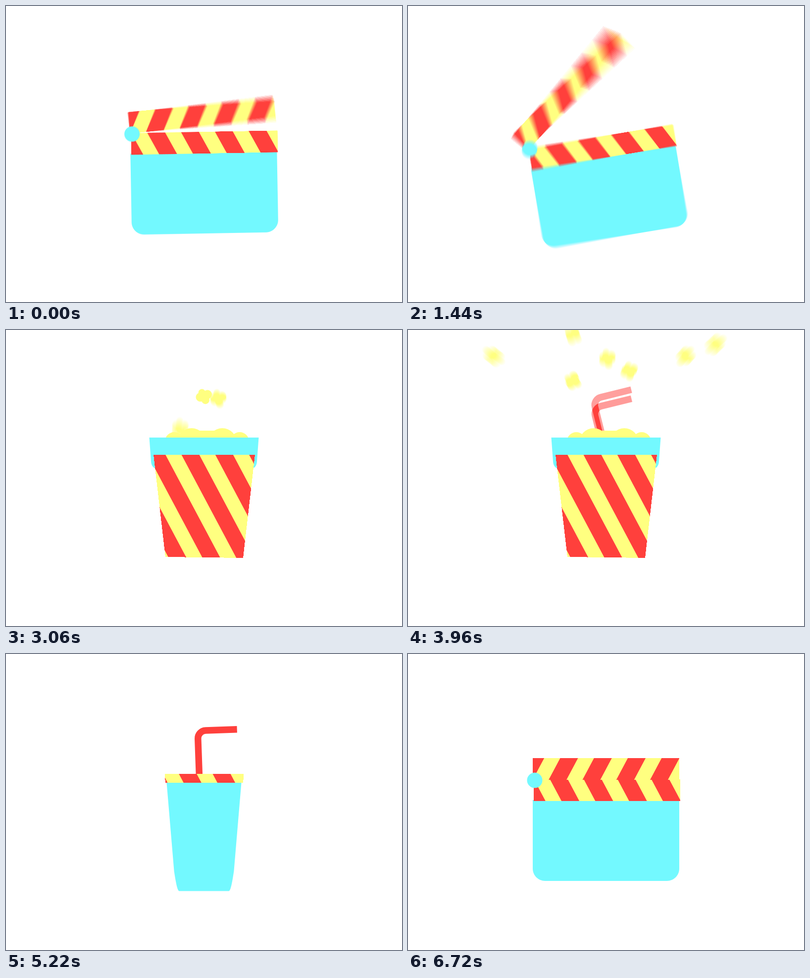
Animation of 800x600 px, one loop 7.26 s. Source, as an HTML page with a canvas:

```html
<!DOCTYPE html>
<html lang="en">
<head>
<meta charset="utf-8">
<title>Cinema morph</title>
<style>
html, body { margin: 0; width: 100%; height: 100%; overflow: hidden; background: #fff; }
canvas { display: block; }
</style>
</head>
<body>
<canvas id="stage" width="800" height="600"></canvas>
<script>
const LOOP = 7260, STEP = 60, LAST = 6720, SHUTTER = 30, SAMPLES = 12;
const RED = '#ff403c', YELLOW = '#ffff80', CYAN = '#73f9ff';
const out = document.getElementById('stage').getContext('2d');
const c = new OffscreenCanvas(800, 600).getContext('2d');
let t = 0;

// Progress of the current time from a to b: constant, slowing, or soft at both ends.
const linear = (a, b) => Math.min(1, Math.max(0, (t - a) / (b - a)));
const slowing = (a, b) => Math.sin(linear(a, b) * Math.PI / 2);
const soft = (a, b) => (1 - Math.cos(linear(a, b) * Math.PI)) / 2;
const mix = (a, b, p) => a.map((v, i) => v + (b[i] - v) * p);

// solid: half top, top, half bottom, bottom, corner rx, ry
// striped: top left, top right, top, bottom left, bottom right, bottom
const clap = [148, 296, 148, 460, 25, 25, 254, 550, 254, 254, 550, 298];
const wide = [126, 188, 126, 265, 12, 10, 286, 516, 253, 305, 497, 423];
const box = [110.5, 218, 106, 280, 8, 12, 298, 503, 253, 322, 479, 461];
const cup = [76, 255, 57, 480.5, 7, 40, 320.5, 480.5, 243, 322, 479, 261];

const BURST = 3960, MOUTH = 225, GRAVITY = 1.3, FLIGHT = 5;
// Where each piece is at BURST, FLIGHT steps after leaving the box
const pieces = [[173, 53], [333, 8], [403, 58], [447, 83], [333, 103], [561, 53], [621, 29]];

function disc(x, y, r) {
  c.moveTo(x + r, y);
  c.arc(x, y, r, 0, 7);
}

function spin(x, y, degrees, scale = 1) {
  c.translate(x, y);
  c.rotate(degrees * Math.PI / 180);
  c.scale(scale, scale);
  c.translate(-x, -y);
}

function fillStripes(points, start, lean) {
  c.save();
  c.beginPath();
  points.forEach(p => c.lineTo(...p));
  c.clip();
  c.fillStyle = YELLOW;
  c.fillRect(0, 0, 800, 600);
  c.fillStyle = RED;
  c.transform(1, 0, lean, 1, start - 254 * lean, 0);
  for (let k = -4; k < 6; k++) c.fillRect(k * 68.3, 0, 36, 600);
  c.restore();
}

function solid(w, top, v, bottom, rx, ry) {
  const y = bottom - ry, side = v + (w - v) * ry / (bottom - top);
  c.fillStyle = CYAN;
  c.beginPath();
  c.moveTo(400 - w, top);
  c.lineTo(400 + w, top);
  c.lineTo(400 + side, y);
  c.bezierCurveTo(400 + v, y + ry * .55, 400 + v - rx * .45, bottom, 400 + v - rx, bottom);
  c.lineTo(400 - v + rx, bottom);
  c.bezierCurveTo(400 - v + rx * .45, bottom, 400 - v, y + ry * .55, 400 - side, y);
  c.fill();
}

function arm() {
  const leaving = t > 1740 && t < 3000;
  const size = leaving ? 1 - .25 * linear(1740, 1880) - .75 * soft(1940, 2100)
    : t < 3000 ? 1 : soft(6000, 6600);
  if (size < .01) return;
  c.save();
  if (leaving) spin(548, 254, 180 * soft(1740, 2060), size);
  else if (t < 3000) spin(256, 256, -51.3 * slowing(-48, 792) - 17.7 * soft(792, 1170) + 69 * soft(1170, 1740));
  else spin(256, 256, -125 * (1 - soft(6060, 6660)), size);
  fillStripes([[252, 211], [548, 211], [548, 254.5], [252, 254.5]], 284.7, -.53);
  c.restore();
}

function straw() {
  const age = Math.max(0, t - BURST);
  const drop = t < BURST ? 0 : 18;
  c.save();
  c.translate(396.5 - 6 * soft(3960, 4320), 350 - 119 * soft(3780, 3940) + drop + 115 * soft(5520, 5760));
  spin(0, 0, -14 * Math.cos(age / 630 * 2 * Math.PI) * Math.exp(-age / 650));
  c.strokeStyle = RED;
  c.lineWidth = 13.5;
  c.beginPath();
  c.moveTo(0, 0);
  c.arcTo(0, -93.5, 79.5, -93.5, 16);
  c.lineTo(79.5, -93.5);
  c.stroke();
  c.restore();
}

function kernel(x, y, turn) {
  c.save();
  c.translate(x, y);
  c.rotate(turn);
  c.fillStyle = YELLOW;
  c.beginPath();
  disc(-6, -5, 9);
  disc(6, -6, 8);
  disc(5, 6, 9);
  disc(-5, 7, 7);
  c.fill();
  c.restore();
}

function popcorn() {
  for (let i = 0; i < 5; i++) {
    const start = 2760 + i * 130, u = linear(start, start + 600);
    const x = 400 + 50 * Math.sin(i * 2.4) * (1 - u / 2);
    kernel(x, 237 - (103 + 18 * i) * 4 * u * (1 - u), u * 4 + i);
  }
  const s = (t - BURST) / STEP + FLIGHT;
  if (s < 0) return;
  for (const [x, y] of pieces) {
    const from = 400 + (x - 400) * .15;
    const vy = (y - MOUTH) / FLIGHT - GRAVITY * FLIGHT / 2;
    kernel(from + (x - from) * s / FLIGHT, MOUTH + vy * s + GRAVITY * s * s / 2, s / 4 + x);
  }
}

function heap() {
  c.save();
  c.translate(0, 60 - 81 * soft(1980, 2160) + 21 * soft(2160, 2700) + 80 * soft(3960, 4260));
  c.fillStyle = YELLOW;
  c.beginPath();
  for (const side of [-1, 1]) {
    disc(406 + side * 66, 226, 19);
    disc(406 + side * 31, 228, 29);
  }
  c.rect(376, 204, 61, 30);
  c.fill();
  c.restore();
}

function render() {
  c.fillStyle = '#fff';
  c.fillRect(0, 0, 800, 600);
  let pose = mix(clap, wide, soft(1600, 2160));
  pose = mix(pose, box, soft(2160, 2700));
  pose = mix(pose, cup, soft(3960, 4800));
  pose = mix(pose, clap, soft(5520, 6300));
  const [left, right, top, bottomLeft, bottomRight, bottom] = pose.slice(6);
  const tilt = soft(1700, 2160) - soft(3960, 4500);

  if (t > 2700 && t < 4500) popcorn();
  if (t > 3780 && t < 5760) straw();
  if (t > 1980 && t < 4260) heap();
  c.save();
  spin(458, 335, -22 * linear(-57, 1200) + 33 * soft(1200, 1770) - 11 * soft(1770, 2160));
  solid(...pose.slice(0, 6));
  fillStripes([[left, top], [right, top], [bottomRight, bottom + tilt], [bottomLeft, bottom - tilt]], 286.8, .53);
  arm();
  c.fillStyle = CYAN;
  c.beginPath();
  disc(256, 256, 15.5 * (1 - soft(1680, 1860) + soft(6000, 6180)));
  c.fill();
  c.restore();
}

let shown = -1;
function frame(now) {
  const time = Math.min(LAST, Math.floor(now % LOOP / STEP) * STEP);
  if (time !== shown) {
    shown = time;
    // Average several moments for motion blur.
    for (let i = 0; i < SAMPLES; i++) {
      t = time + SHUTTER * ((i + .5) / SAMPLES - .5);
      render();
      out.globalAlpha = 1 / (i + 1);
      out.drawImage(c.canvas, 0, 0);
    }
  }
  requestAnimationFrame(frame);
}
frame(performance.now());
</script>
</body>
</html>
```
